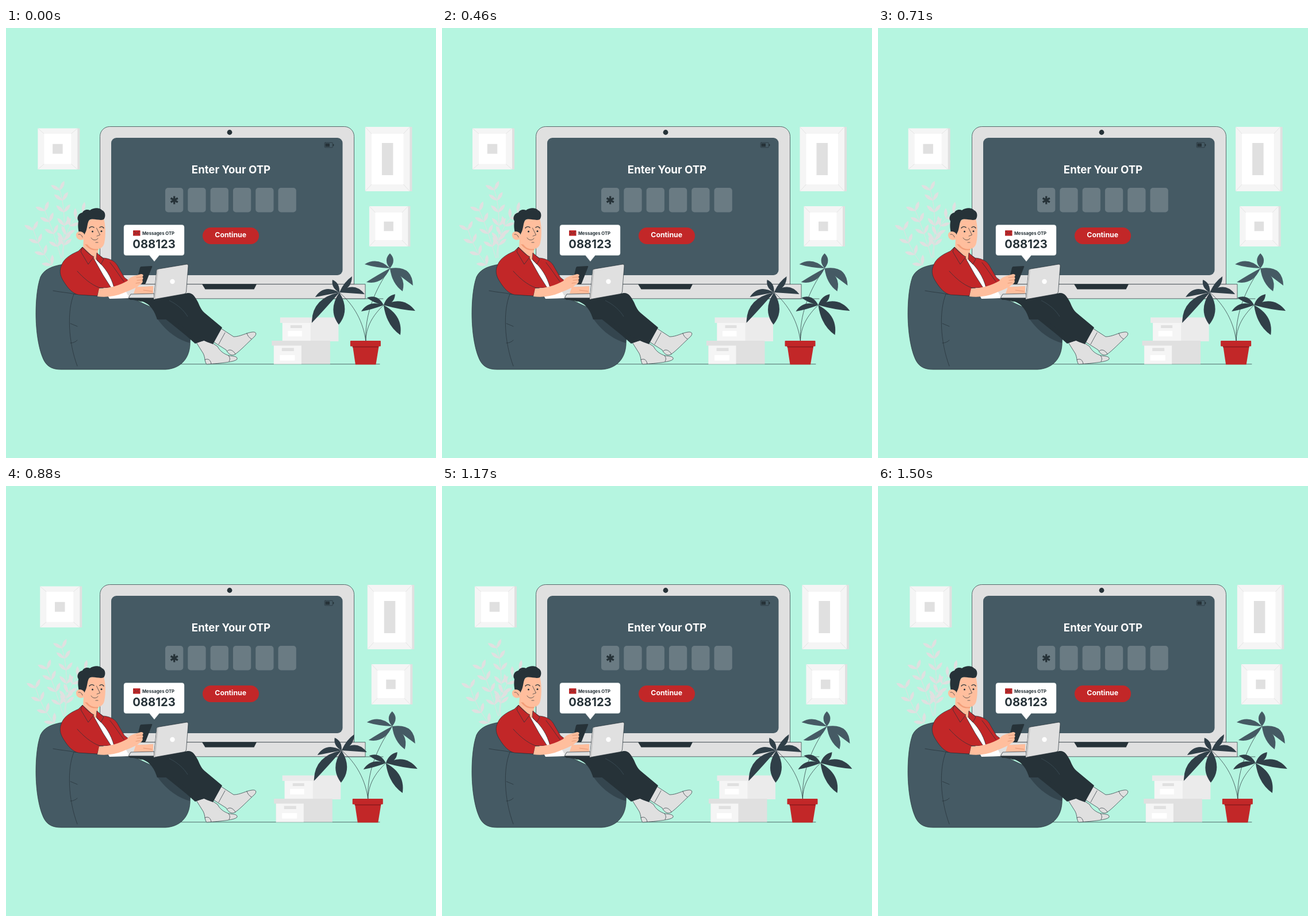
An HTML page for the animation above (1540 ms loop, 748 px wide and 748 px high).

```html
<!DOCTYPE html>
<html lang="en">
<head>
<meta charset="utf-8">
<title>Enter Your OTP</title>
<style>
  html, body { margin: 0; width: 100%; height: 100%; overflow: hidden; background: #b5f5e0; }
  svg { display: block; width: 100%; height: 100%; }
  text { font-family: Inter, "Open Sans", sans-serif; font-weight: 700; text-anchor: middle; }
  .ink { fill: #263238; }
  .slate { fill: #455a64; }
  .deep { fill: #303f48; }
  .red { fill: #c22728; }
  .skin { fill: #ffbe9d; }
  .white { fill: #fff; }
  .g1 { fill: #f5f5f5; }
  .g2 { fill: #ebebeb; }
  .g3 { fill: #e0e0e0; }
  .line { fill: none; stroke: #263238; stroke-width: .7; stroke-linecap: round; stroke-linejoin: round; }
  .edge { stroke: #263238; stroke-width: .7; stroke-linejoin: round; }
</style>
</head>
<body>
<svg viewBox="0 0 748 748">
  <g class="shake">
    <g id="frames"></g>
    <g id="fern"></g>
  </g>

  <path class="line" d="M270 584.7H650M560 471H656"/>

  <g id="monitor">
    <path class="g3 edge" d="M163.5 460V188.500a17 17 0 0 1 17-17H588.500a17 17 0 0 1 17 17V446H163.500Z"/>
    <path class="g3" d="M150 446H625V471H150Z"/>
    <path class="line" d="M150 445.700H625V470.800H200"/>
    <path class="ink" d="M341 445.500H436L431.500 454.500H346.500Z"/>
    <circle class="ink" cx="389" cy="181.500" r="4.400"/>
    <rect class="slate" x="183" y="191" width="402.500" height="239" rx="9"/>
    <rect class="line" x="554.300" y="199.300" width="14" height="8.600" rx="1"/>
    <path class="ink" d="M555.500 200.700h7.500v5.800h-7.500zM568.800 202h1.500v3.300h-1.500z"/>
    <text class="white" x="391.500" y="253" font-size="18.600">Enter Your OTP</text>
    <g id="cells" fill="#6a7b83"></g>
    <path d="M292.700 292.500V306.500M286.600 296L298.800 303M286.600 303L298.800 296" stroke="#263238" stroke-width="3.200"/>
    <rect class="red" x="342" y="347" width="98" height="29" rx="14.500"/>
    <text class="white" x="390.700" y="364.300" font-size="12.300">Continue</text>
  </g>

  <g class="shake">
    <path class="g2" d="M477 503.500H578.500V545H481V513H477Z"/>
    <path class="g1" d="M481 513H530V545H481Z"/>
    <path class="g3" d="M495 517h20v5h-20zM462.500 544H564V584.500H466V552.500H462.500Z"/>
    <path class="g1" d="M466 552.500H514V584.500H466Z"/>
    <path class="g3" d="M480 556.500h21v5.500h-21z"/>
    <path class="white" d="M490.500 527h24.500v9.500h-24.500zM476.500 569h26v9.500h-26z"/>
    <path class="line" d="M626 545C624 500 640 458 668 418M626 545C622 512 606 482 580 460M626 545C626 520 638 500 657 482"/>
    <g id="palm"></g>
    <path class="red" d="M603 552H649L643.500 585.500H608Z"/>
    <path fill="#8f1b1d" d="M602.500 553.500H648.500L648 555.500H603Z"/>
    <rect class="red" x="599" y="544" width="53" height="9.700" rx="1"/>
  </g>

  <g id="bag">
    <path class="slate edge" d="M100 411C80 414 66 420 60 433C54 450 52 475 52 497C52 528 57 562 67 580C73 590 82 594 96 594H277C301 593 318 578 320 552C321 535 318 522 300 514L262 490L210 466L130 440Z"/>
    <path fill="#34454e" d="M262 504L292 506L322 534L320 548C300 543 278 528 262 504Z"/>
    <path class="line" d="M82 457C96 460 108 460 120 463M118 463C106 492 108 545 124 588M112 514L124 519M112 548C117 548 121 546 124 543M120 463C160 467 205 467 236 476"/>
  </g>

  <g id="legs">
    <path class="g3 edge" d="M331 547L350 542L368 554C372 562 379 567 388 570C396 571 403 571 402 576C398 581 375 583 349 585C345 580 347 574 343 566Z"/>
    <path class="line" d="M387 570C390 573 390 577 388 580M346 577C352 574 356 578 357 584"/>
    <path class="ink" d="M276 505L318 510L352 541L329 549L312 534Z"/>
    <path class="g3 edge" d="M373 522L396 537C408 537 418 530 428 529C435 528 437 532 432 537C420 548 408 561 398 568C391 571 386 566 383 560L361 546Z"/>
    <path class="line" d="M419 531C420 535 423 539 427 541M385 562C388 558 395 560 399 567M381 530L370 550"/>
    <path class="ink" d="M214 471L250 473L316 461C324 460 329 467 334 477C337 484 340 491 346 496L376 521L360 550C345 545 336 540 326 534L290 507H263C259 494 252 481 238 476Z"/>
    <path d="M284 474C300 482 310 492 316 502" fill="none" stroke="#455a64" stroke-width=".6"/>
  </g>

  <g id="man">
    <path class="white" d="M147 395L162 394L190 425L215 470L180 471L163 440Z"/>
    <path class="red edge" d="M158 392L169 400C182 401 191 406 196 417L206 434L219 444L203 458L188 452C183 432 172 416 158 404Z"/>
    <path class="skin" d="M135 364L134 386C140 396 149 402 158 404C161 396 160 386 159 380Z"/>
    <path class="red edge" d="M133 381L126 388C110 395 100 402 96 414C92 424 95 433 101 442C108 453 116 462 126 464L159 466L163 452L183 452L169 430L151 398Z"/>
    <path class="red edge" d="M133 381L130 389L143 411L153 398C145 394 139 389 133 381ZM158 391L170 402L165 411L157 402Z"/>
    <path class="line" d="M124 423C135 435 147 446 163 452M181 408C190 419 198 432 205 441"/>
    <path fill="#f29d78" d="M137 376C144 385 151 388 161 386L159 379Z"/>
    <path class="skin" d="M138 342C141 333 158 327 170 331C173 342 174 360 171 374C169 383 161 386 152 384C143 382 138 372 136 364Z"/>
    <path class="ink" d="M128 359C125 351 125 342 126 336C122 330 126 322 133 321C135 316 142 315 146 317C153 312 163 312 167 317C173 319 174 328 170 333C163 336 151 330 145 334C141 338 142 349 138 356L134 364Z"/>
    <path class="skin" d="M136 358C132 352 123 353 122 359C121 367 130 372 137 366Z"/>
    <path class="line" d="M126 359C130 358 132 361 133 364"/>
    <path class="line" d="M157.500 348L163.500 360L158 362M148 365C151 370 157 370 160 366M156 373H160" stroke-width="1"/>
    <path class="line" d="M145 348C147 345 151 345 153 347M163 347C165 345 168 345 170 348" style="stroke-width:1.400"/>
    <circle class="ink" cx="150.500" cy="354" r="1.500"/>
    <circle class="ink" cx="166" cy="353.500" r="1.500"/>

    <path class="ink" d="M235 415L253 414Q255 414 254 416L243 444Q242 446 240 446L228 445Q226 444 227 442L233 417Q234 415 235 415Z"/>
    <path class="skin" d="M226 450C236 451 246 449 256 449V462H222Z"/>
    <path class="skin" d="M162 453C181 453 199 447 211 440C214 434 221 432 228 430L235 428C239 428 240 431 237 433C239 434 239 437 237 438C239 441 237 445 232 447C226 453 213 457 204 461C190 467 174 469 159 467Z"/>
    <path class="line" d="M227 434L237 433M228 439L237 438M226 444L233 443M239 456L254 458" stroke="#eb956d" style="stroke:#d98762"/>
    <path class="g3 edge" d="M217 463L258 462V470H213Z"/>
    <path class="ink" d="M213 469.500H259V473H216Z"/>
    <path class="g3 edge" d="M266 419L314 411Q317.500 410.500 317 414L313.500 459Q313 462 310 462.500L257 472L262 422Q262.500 419.500 266 419Z"/>
    <path fill="#c7c7c7" d="M262.500 421L265 419.500L260 471L257 472Z"/>
    <circle class="white" cx="289.500" cy="441" r="4.200"/>
  </g>

  <g id="bubble">
    <path class="white" stroke="#c9d3d1" stroke-width=".5" d="M209 342.500H306Q310 342.500 310 346.500V391.500Q310 395.500 306 395.500H266.500L258 406L249.500 395.500H209Q205 395.500 205 391.500V346.500Q205 342.500 209 342.500Z"/>
    <rect class="red" x="221" y="352" width="12.500" height="9.500" rx="1.200"/>
    <path class="line" d="M221.500 352.800L227.200 357.500L233 352.800M221.500 361L225.500 356.300M233 361L229 356.300" style="stroke-width:.5"/>
    <text class="ink" x="265" y="359.800" font-size="7.700">Messages OTP</text>
    <text class="ink" x="257.500" y="382.500" font-size="20.200">088123</text>
  </g>
</svg>

<script>
const byId = id => document.getElementById(id);
const rect = (x, y, w, h, cls) => `<rect x="${x}" y="${y}" width="${w}" height="${h}" class="${cls}"/>`;

// Outer box, mat inset and centre block of a hanging picture
function picture(x, y, w, h, inX, inY, bw, bh) {
  const r = x + w, b = y + h, m = [x + inX, y + inY, r - inX, b - inY];
  return rect(x + w - 1, y, 5, h, 'g3') + rect(x, y, w, h, 'g1') +
    `<path d="M${x} ${y}L${m[0]} ${m[1]}M${r} ${y}L${m[2]} ${m[1]}M${x} ${b}L${m[0]} ${m[3]}M${r} ${b}L${m[2]} ${m[3]}" stroke="#ddd" stroke-width=".7"/>` +
    rect(m[0], m[1], w - 2 * inX, h - 2 * inY, 'white') +
    rect(x + (w - bw) / 2, y + (h - bh) / 2, bw, bh, 'g3');
}

// Leaf from base to tip; bend curves the spine sideways
function leaf(x, y, tx, ty, w, bend, cls) {
  const dx = tx - x, dy = ty - y, len = Math.hypot(dx, dy);
  const ctrl = k => `${x + dx * .55 - dy / len * k} ${y + dy * .55 + dx / len * k}`;
  return `<path class="${cls}" d="M${x} ${y}Q${ctrl(bend + w)} ${tx} ${ty}Q${ctrl(bend - w)} ${x} ${y}Z"/>`;
}

// Curved stem with pairs of small leaves
function sprig(x0, y0, cx, cy, x1, y1, pairs) {
  let out = `<path d="M${x0} ${y0}Q${cx} ${cy} ${x1} ${y1}" fill="none" stroke="#e0e0e0" stroke-width="1"/>`;
  for (let i = 0; i < pairs; i++) {
    const u = .2 + .74 * i / (pairs - 1), v = 1 - u;
    const x = v * v * x0 + 2 * u * v * cx + u * u * x1;
    const y = v * v * y0 + 2 * u * v * cy + u * u * y1;
    const a = Math.atan2(v * (cy - y0) + u * (y1 - cy), v * (cx - x0) + u * (x1 - cx));
    for (const s of [-.75, .75])
      out += leaf(x, y, x + 18 * Math.cos(a + s), y + 18 * Math.sin(a + s), 6, 0, 'g3');
  }
  return out;
}

const fan = (x, y, cls, leaves) => leaves.map(([tx, ty, w, b]) => leaf(x, y, tx, ty, w, b, cls)).join('');

byId('frames').innerHTML =
  picture(55.5, 174.5, 69, 71.5, 11, 9.500, 17.5, 17) +
  picture(625, 172, 77.5, 112, 11, 12, 19.5, 56) +
  picture(632, 310, 67.5, 70, 10.500, 11, 16.5, 16.5);

byId('fern').innerHTML =
  sprig(97, 400, 108, 320, 92, 277, 5) +
  sprig(92, 425, 60, 395, 46, 346, 4) +
  sprig(96, 400, 82, 350, 66, 314, 4) +
  sprig(100, 400, 98, 342, 138, 317, 5);

byId('cells').innerHTML = Array.from({ length: 6 }, (_, i) =>
  `<rect x="${277 + 39.3 * i}" y="278" width="31.300" height="42.500" rx="5"/>`).join('');

byId('palm').innerHTML =
  fan(668, 418, 'slate', [
    [668, 392, 12, 0], [624, 411, 10, 7], [627, 442, 10, -9],
    [708, 448, 14, -14], [690, 458, 15, -5]
  ]) +
  fan(580, 460, 'deep', [
    [568, 438, 9, 0], [602, 432, 9, 4], [624, 463, 11, -11],
    [538, 468, 10, 10], [532, 513, 15, 14], [579, 516, 20, 0]
  ]) +
  fan(657, 482, 'deep', [
    [677, 463, 10, 2], [628, 469, 9, 5], [618, 493, 9, 7],
    [712, 492, 13, -10], [686, 534, 17, -4]
  ]);

const LOOP = 1540, TICK = 1000 / 24, SHAKE = 1500, LEAD = 20;
const stops = [0, -1, 2, -4, 4, -4, 4, -4, 2, -1, 0];
const shaken = document.querySelectorAll('.shake');

function offset(t) {
  const p = (t + LEAD) % SHAKE / SHAKE * 10, i = Math.floor(p);
  return stops[i] + (stops[i + 1] - stops[i]) * (p - i);
}

function draw(now) {
  const tick = Math.floor((now % LOOP + 4) / TICK) % 37;
  const x = offset(tick * TICK).toFixed(2);
  shaken.forEach(g => g.setAttribute('transform', `translate(${x} 0)`));
  requestAnimationFrame(draw);
}
draw(performance.now());
</script>
</body>
</html>
```
